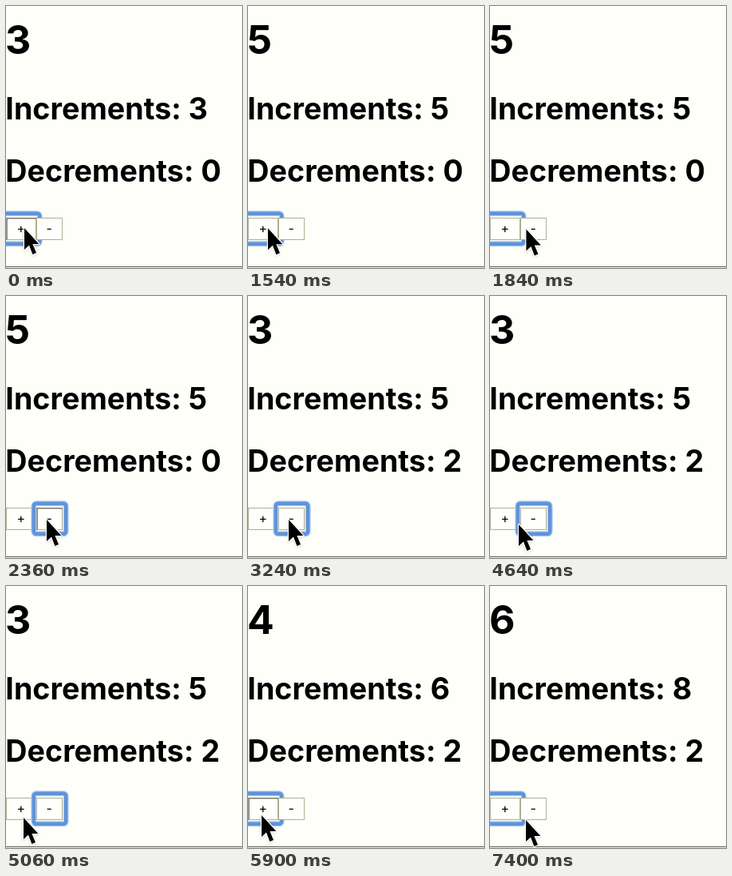
These frames come from a looping animation (296x328 px, 7.42 s). An HTML page:

```html
<!DOCTYPE html>
<html lang="en">
<head>
<meta charset="utf-8">
<title>Counter</title>
<style>
  html, body { margin: 0; width: 100%; height: 100%; overflow: hidden; background: #fffffa; }
  svg { display: block; width: 296px; height: 328px; }
  text { font-family: Inter, Roboto, sans-serif; fill: #000; }
  .head { font-weight: 700; font-size: 37.7px; }
  .total { font-size: 50px; }
  .sign { font-size: 16px; text-anchor: middle; }
  .face { fill: #fffffc; stroke: #b0b092; }
  .dent { fill: none; stroke: #77776a; stroke-width: 1.6; }
  .ring { fill: none; stroke: #5f93da; stroke-width: 4.4; }
  .halo { stroke: #b3cdf0; stroke-width: 7; }
  .arrow { fill: #000; stroke: #fff; stroke-width: 2.4; stroke-linejoin: round; paint-order: stroke;
    filter: drop-shadow(0 1px 1.5px rgba(70, 70, 20, .2)); }
</style>
</head>
<body>
<svg viewBox="0 0 296 328">
  <text class="head total" id="total" x="-1" y="60.3"></text>
  <text class="head" id="ups" x="-.7" y="141.8"></text>
  <text class="head" id="downs" x="-.7" y="219.8"></text>
  <rect y="326" width="296" height="1" fill="#55554a"/>
  <g id="plus"></g>
  <g id="minus"></g>
  <path class="arrow" id="arrow" d="M0 0V27L6 21.5L10.4 33L15 31L10.4 20H18.4Z"/>
</svg>
<script>
  const LOOP = 7420;
  const $ = id => document.getElementById(id);

  // alternating press and release times
  const toggles = {
    plus: [0, 280, 440, 720, 5340, 5600, 5880, 6140, 6460, 6740],
    minus: [2360, 2600, 2820, 3220]
  };

  // pointer: start and end time, then where it goes
  const home = [23, 278];
  const moves = [
    [1520, 2100, 51, 280],
    [4320, 4640, 36, 286],
    [4740, 5060, 22, 290],
    [5160, 5340, 17, 287],
    [7280, 7400, 45, 293]
  ];

  function build(id, sign, left, right) {
    const ring = `x="${left - 3.2}" y="259.8" width="${right - left + 7.4}" height="38" rx="3"`;
    $(id).innerHTML = `
      <rect class="face" x="${left + .5}" y="265.5" width="${right - left - 1}" height="27"/>
      <path class="dent" d="M${left + 1} 293V265.8H${right}"/>
      <g class="focus"><rect class="ring halo" ${ring}/><rect class="ring" ${ring}/></g>
      <text class="sign" x="${(left + right) / 2 - .3}" y="284.3">${sign}</text>`;
  }

  function pointer(t) {
    return moves.reduce(([x, y], [start, end, toX, toY]) => {
      const k = Math.min(1, Math.max(0, (t - start) / (end - start)));
      const ease = k * (2 - k);
      return [x + (toX - x) * ease, y + (toY - y) * ease];
    }, home);
  }

  function show(id, part, on) {
    $(id).querySelector(part).style.display = on ? '' : 'none';
  }

  function draw(t) {
    const past = id => toggles[id].filter(time => time <= t);
    const last = id => Math.max(-1, ...past(id));
    const clicks = id => past(id).length >> 1;
    const active = last('plus') > last('minus') ? 'plus' : 'minus';

    for (const id in toggles) {
      show(id, '.focus', id === active);
      show(id, '.dent', past(id).length % 2);
    }
    const ups = 3 + clicks('plus'), downs = clicks('minus');
    $('total').textContent = ups - downs;
    $('ups').textContent = `Increments: ${ups}`;
    $('downs').textContent = `Decrements: ${downs}`;
    $('arrow').setAttribute('transform', `translate(${pointer(t)})`);
  }

  function tick() {
    draw(performance.now() % LOOP);
    requestAnimationFrame(tick);
  }

  build('plus', '+', 0, 38);
  build('minus', '-', 38, 71);
  tick();
</script>
</body>
</html>
```
